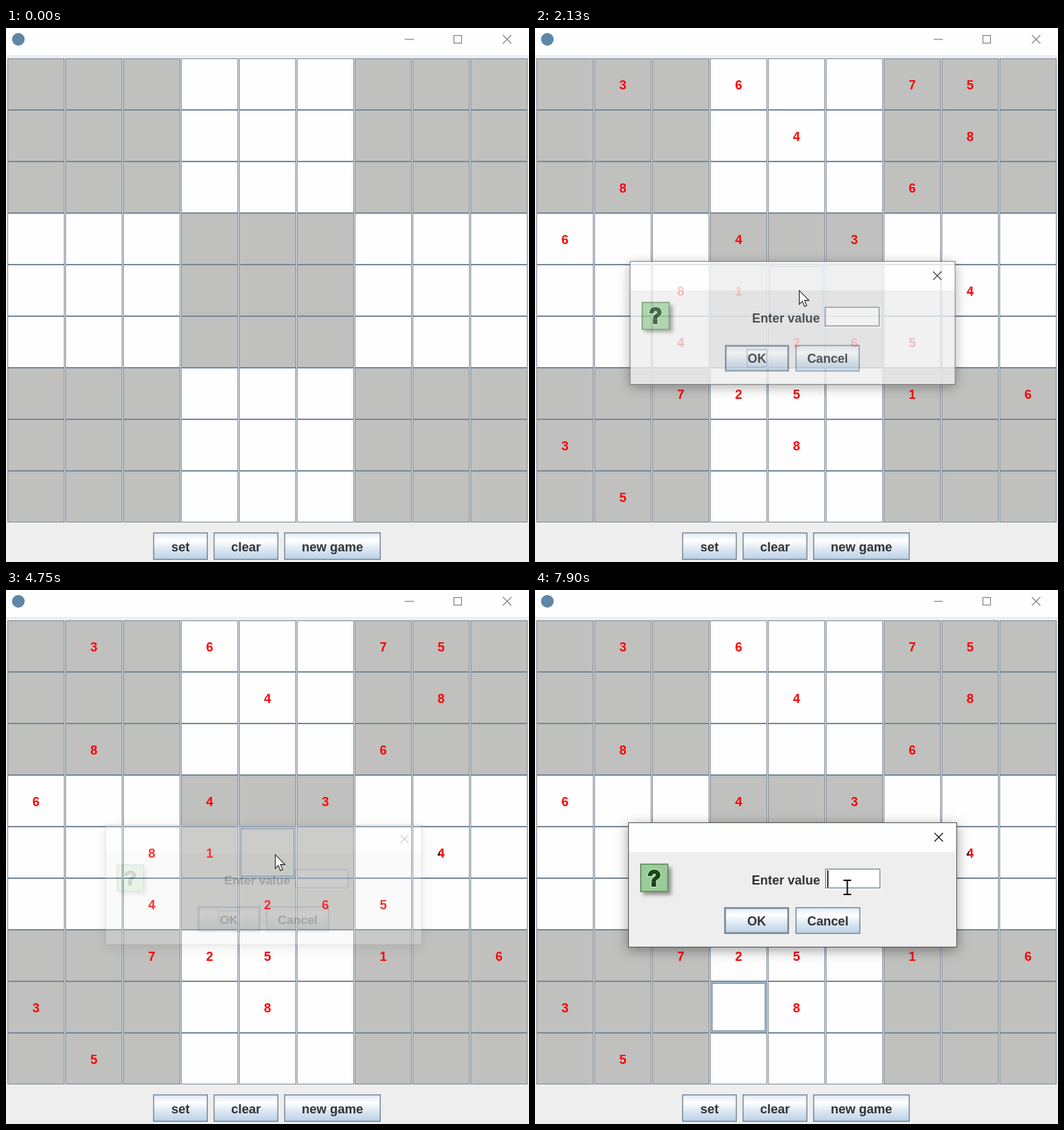
Recreate the animation shown at these times as an HTML page with a canvas. Size 741 by 756 pixels, loop 8 s.

```html
<!DOCTYPE html>
<html lang="en">
<head>
<meta charset="utf-8">
<title>Sudoku board</title>
<style>
html, body { margin: 0; width: 100%; height: 100%; overflow: hidden; background: #eee; }
canvas { display: block; }
</style>
</head>
<body>
<canvas id="stage" width="741" height="756"></canvas>
<script>
const stage = document.getElementById('stage');
const stageCtx = stage.getContext('2d');
const layer = document.createElement('canvas');
layer.width = stage.width;
layer.height = stage.height;
const layerCtx = layer.getContext('2d');
let ctx = stageCtx;

const LOOP = 8000;
const SANS = '"Liberation Sans", Arial, sans-serif';
const LINE = '#7a8a99', PALE = '#b8cfe5', INK = '#333';

const PUZZLE = [
  '.3.6..75.', '....4..8.', '.8....6..',
  '6..4.3...', '..81...4.', '..4.265..',
  '..725.1.6', '3...8....', '.5.......'
];

// Each entry updates the interface state from its time on.
const SCRIPT = [
  [0, { active: false, filled: false, solved: false, dialog: '', alpha: 1, hover: '', focus: '', typed: '', caret: false }],
  [400, { hover: 'new game' }],
  [500, { active: true }],
  [600, { active: false, dialog: 'choose', alpha: 0.6, focus: 'build my own board' }],
  [700, { alpha: 1 }],
  [1110, { over: 'preset board' }],
  [1210, { pressed: 'preset board', focus: 'preset board' }],
  [1310, { dialog: '', active: true, filled: true, hover: '', focus: 'new game', pressed: '', over: '' }],
  [1920, { hover: '4,4' }],
  [2030, { focus: '' }],
  [2130, { active: false, dialog: 'enter', alpha: 0.78, focus: 'OK' }],
  [2220, { alpha: 1 }],
  [2630, { focus: 'field', caret: true }],
  [2940, { typed: '1' }],
  [3230, { dialog: 'message', alpha: 0.62, focus: 'OK', typed: '', caret: false }],
  [3640, { alpha: 1, smudge: true }],
  [3840, { over: 'OK' }],
  [3950, { pressed: 'OK' }],
  [4050, { dialog: '', active: true, focus: '', pressed: '', over: '' }],
  [4750, { active: false, dialog: 'enter', alpha: 0.2, focus: 'OK' }],
  [4870, { alpha: 0.85 }],
  [4970, { alpha: 1 }],
  [5470, { focus: 'field', caret: true }],
  [5570, { typed: '7' }],
  [5760, { alpha: 0.4, active: true, solved: true }],
  [5870, { dialog: '', hover: '', focus: '', typed: '', caret: false }],
  [6580, { hover: '3,7' }],
  [6680, { active: false }],
  [6790, { dialog: 'enter', alpha: 0.7, focus: 'OK' }],
  [6890, { alpha: 1 }],
  [7500, { focus: 'field', caret: true }],
  [7610, { caret: false }],
  [7900, { caret: true }]
];

// Pointer moves: start, end, destination.
const MOVES = [
  [100, 400, 462, 728], [800, 1110, 443, 423], [1820, 1920, 374, 371],
  [2330, 2520, 435, 405], [3640, 3840, 372, 428], [4150, 4250, 390, 412],
  [4460, 4560, 381, 374], [4870, 5060, 425, 412], [6270, 6580, 287, 577],
  [7290, 7500, 442, 421]
];
const CLICKS = [500, 1210, 2030, 2630, 3950, 4650, 5470, 6580, 7500];

function stateAt(t) {
  const state = {};
  for (const [time, change] of SCRIPT) if (time <= t) Object.assign(state, change);
  return state;
}

// The screen refreshes about ten times a second, so moves advance in steps.
function pointerAt(t) {
  let x = 475, y = 780;
  for (const [start, end, toX, toY] of MOVES) {
    if (t < start) break;
    const steps = Math.round((end - start) / 103) + 1;
    const p = Math.min(1, (Math.floor((t - start) / 103) + 1) / steps);
    const k = t >= end ? 1 : p * p * (3 - 2 * p);
    x += (toX - x) * k;
    y += (toY - y) * k;
  }
  return { x, y };
}

function fill(color, x, y, w, h) {
  ctx.fillStyle = color;
  ctx.fillRect(x, y, w, h);
}

function outline(color, x, y, w, h, width = 1) {
  ctx.strokeStyle = color;
  ctx.lineWidth = width;
  ctx.strokeRect(x + width / 2, y + width / 2, w - width, h - width);
}

function text(str, x, y, { size = 18, weight = 'bold', color = INK, align = 'left', family = SANS } = {}) {
  ctx.font = `${weight} ${size}px ${family}`;
  ctx.textAlign = align;
  ctx.fillStyle = color;
  ctx.fillText(str, x, y);
}

function cross(x, y, color) {
  ctx.strokeStyle = color;
  ctx.lineWidth = 1.3;
  ctx.beginPath();
  ctx.moveTo(x - 6, y - 6); ctx.lineTo(x + 6, y + 6);
  ctx.moveTo(x + 6, y - 6); ctx.lineTo(x - 6, y + 6);
  ctx.stroke();
}

function hoverRing(x, y, w, h) {
  outline(PALE, x + 1, y + 1, w - 2, h - 2, 2);
  outline(LINE, x + 2, y + 2, w - 4, h - 4, 1.5);
}

function button(label, x, y, w, h, look = {}) {
  const size = look.size || 18;
  const shade = ctx.createLinearGradient(0, y, 0, y + h);
  shade.addColorStop(0, '#dde8f3');
  shade.addColorStop(0.3, '#fff');
  shade.addColorStop(0.6, '#dde8f3');
  shade.addColorStop(1, PALE);
  fill(look.pressed ? PALE : shade, x, y, w, h);
  outline(LINE, x, y, w, h, look.main || look.pressed ? 2.5 : 1.5);
  if (look.hover && !look.pressed) hoverRing(x, y, w, h);
  const cx = x + w / 2;
  text(label, cx, Math.round(y + h / 2 + 7), { size, align: 'center' });
  if (look.focus) {
    const tw = ctx.measureText(label).width + 3;
    outline('#a3b8cc', cx - tw / 2, y + h / 2 - 13, tw, 26, 1.3);
  }
}

function drawWindow(s) {
  fill('#eee', 0, 0, 741, 756);
  fill('#fefefe', 0, 0, 741, 38);
  ctx.fillStyle = '#5f87a5';
  ctx.beginPath();
  ctx.arc(17.5, 16, 9, 0, 7);
  ctx.fill();
  const glyph = s.active ? '#111' : '#858585';
  fill(glyph, 565, 15.5, 13, 1.2);
  outline(glyph, 634, 10, 12, 12, 1.2);
  cross(710, 16, glyph);

  for (let row = 0; row < 9; row++)
    for (let col = 0; col < 9; col++) drawCell(s, col, row);

  const controls = [['set', 208.5, 77.5], ['clear', 294, 92], ['new game', 394, 137]];
  for (const [label, x, w] of controls)
    button(label, x, 714, w, 39, { hover: s.hover === label, focus: s.active && s.focus === label });
}

function drawCell(s, col, row) {
  const x = Math.round(1.6 + col * 82.05), y = 43 + row * 73;
  const box = Math.floor(col / 3) + Math.floor(row / 3);
  fill(box % 2 ? '#fefefe' : '#c0c0be', x, y, 81, 73);
  outline(LINE, x, y, 81, 73);
  if (s.hover === `${col},${row}`) hoverRing(x, y, 81, 73);
  const cx = x + 40.5, base = y + 44;
  const digit = PUZZLE[row][col];
  if (s.filled && digit !== '.') {
    text(digit, cx, base, { color: '#f00', align: 'center' });
    if (s.smudge && col === 7 && row === 4) {
      ctx.save();
      ctx.beginPath();
      ctx.rect(x, y, 39, 73);
      ctx.clip();
      text(digit, cx, base, { color: '#111', align: 'center' });
      ctx.restore();
    }
  }
  if (s.solved && col === 4 && row === 4) text('7', cx, base, { color: '#000', align: 'center' });
}

function panel(x, y, w, h) {
  ctx.save();
  ctx.shadowColor = 'rgba(0,0,0,.38)';
  ctx.shadowBlur = 16;
  ctx.shadowOffsetY = 4;
  fill('#eee', x, y, w, h);
  ctx.restore();
  fill('#fefefe', x, y, w, 42);
  outline('#555', x, y, w, h);
  cross(x + w - 26, y + 21, '#111');
}

function iconShadow() {
  ctx.shadowColor = 'rgba(0,0,0,.4)';
  ctx.shadowBlur = 5;
  ctx.shadowOffsetX = ctx.shadowOffsetY = 4;
}

function questionIcon(x, y) {
  ctx.save();
  iconShadow();
  fill('#99cc99', x, y, 40, 40);
  ctx.restore();
  outline('#5c8a5c', x, y, 40, 40, 1.5);
  ctx.font = `bold 31px ${SANS}`;
  ctx.textAlign = 'center';
  ctx.strokeStyle = '#cfeacf';
  ctx.lineWidth = 4;
  ctx.strokeText('?', x + 20, y + 31);
  ctx.strokeStyle = '#0b2f0b';
  ctx.lineWidth = 2;
  ctx.strokeText('?', x + 20, y + 31);
  text('?', x + 20, y + 31, { size: 31, color: '#174a17', align: 'center' });
}

function infoIcon(x, y) {
  const glow = ctx.createLinearGradient(x, y - 19, x, y + 19);
  glow.addColorStop(0, '#ccccff');
  glow.addColorStop(1, '#eeeeff');
  ctx.save();
  iconShadow();
  ctx.fillStyle = glow;
  ctx.beginPath();
  ctx.arc(x, y, 18.5, 0, 7);
  ctx.fill();
  ctx.restore();
  ctx.strokeStyle = '#555';
  ctx.lineWidth = 1.5;
  ctx.stroke();
  const ink = '#55557f';
  fill(ink, x - 3, y - 12, 6, 5);
  fill(ink, x - 5, y - 4, 8, 2.5);
  fill(ink, x - 2.5, y - 4, 5.5, 14);
  fill(ink, x - 5.5, y + 9, 11, 2.5);
}

const DIALOGS = {
  choose: {
    box: [50, 289, 640, 177],
    draw(look) {
      questionIcon(66.5, 347);
      text('Would you like to build your own board or solve a preset game?', 135, 378, { size: 17.8 });
      button('build my own board', 164, 408, 200, 38, look('build my own board'));
      button('preset board', 373.5, 408, 200, 38, look('preset board'));
    }
  },
  enter: {
    box: [132, 329, 466, 177],
    draw(look, s) {
      questionIcon(149, 387.5);
      text('Enter value', 307, 417);
      fill('#fff', 411, 394.5, 80, 30);
      outline(LINE, 411, 394.5, 78.5, 28, 1.4);
      text(s.typed, 415, 416, { weight: 'normal' });
      if (s.caret) fill('#111', s.typed ? 424 : 414, 397, 1.7, 24);
      button('OK', 268, 449, 92, 38, { ...look('OK'), main: true });
      button('Cancel', 369, 449, 92, 38, look('Cancel'));
    }
  },
  message: {
    box: [136, 288.5, 466, 177],
    draw(look) {
      text('Message', 146, 317.5, { size: 17.2, weight: 'normal', family: '"Open Sans", sans-serif' });
      infoIcon(172, 366);
      text('Illegal value', 221.5, 378, { size: 17.8 });
      button('OK', 339.5, 408, 58, 38, { ...look('OK'), main: true });
    }
  }
};

function drawDialog(s) {
  const dialog = DIALOGS[s.dialog];
  if (!dialog) return;
  const [x, y, w, h] = dialog.box;
  const look = label => ({
    size: 17.8, focus: s.focus === label, hover: s.over === label, pressed: s.pressed === label
  });
  const paint = () => { panel(x, y, w, h); dialog.draw(look, s); };
  if (s.alpha === 1) return paint();

  // Fade the dialog as one flat layer while it grows to full size.
  const scale = 1 - 0.045 * (1 - s.alpha);
  const cx = x + w / 2, cy = y + h / 2;
  ctx = layerCtx;
  ctx.clearRect(0, 0, layer.width, layer.height);
  ctx.save();
  ctx.translate(cx, cy);
  ctx.scale(scale, scale);
  ctx.translate(-cx, -cy);
  paint();
  ctx.restore();
  ctx = stageCtx;
  ctx.globalAlpha = s.alpha;
  ctx.drawImage(layer, 0, 0);
  ctx.globalAlpha = 1;
}

function drawPointer(s, { x, y }, t) {
  if (CLICKS.some(c => t >= c && t < c + 95)) {
    ctx.fillStyle = 'rgba(228,222,30,.75)';
    ctx.beginPath();
    ctx.arc(x, y + 1, 18, 0, 7);
    ctx.fill();
  }
  const overField = s.dialog === 'enter' && s.alpha === 1 && x > 411 && x < 490 && y > 394 && y < 424;
  ctx.save();
  ctx.translate(x, y);
  ctx.beginPath();
  if (overField) {
    ctx.moveTo(-5, -10); ctx.lineTo(6, -10);
    ctx.moveTo(0.5, -10); ctx.lineTo(0.5, 10);
    ctx.moveTo(-5, 10); ctx.lineTo(6, 10);
    ctx.strokeStyle = '#111';
    ctx.lineWidth = 2;
    ctx.stroke();
  } else {
    ctx.scale(1.22, 1.22);
    const arrow = [[0.4, 0.6], [0.4, 16.5], [4, 13], [6.4, 19], [9, 18], [6.5, 12], [11.6, 12]];
    arrow.forEach(p => ctx.lineTo(...p));
    ctx.closePath();
    ctx.fillStyle = '#fff';
    ctx.fill();
    ctx.strokeStyle = '#222';
    ctx.lineWidth = 0.9;
    ctx.stroke();
  }
  ctx.restore();
}

function frame(now) {
  const t = now % LOOP;
  const s = stateAt(t);
  drawWindow(s);
  drawDialog(s);
  drawPointer(s, pointerAt(t), t);
  requestAnimationFrame(frame);
}
requestAnimationFrame(frame);
</script>
</body>
</html>
```
